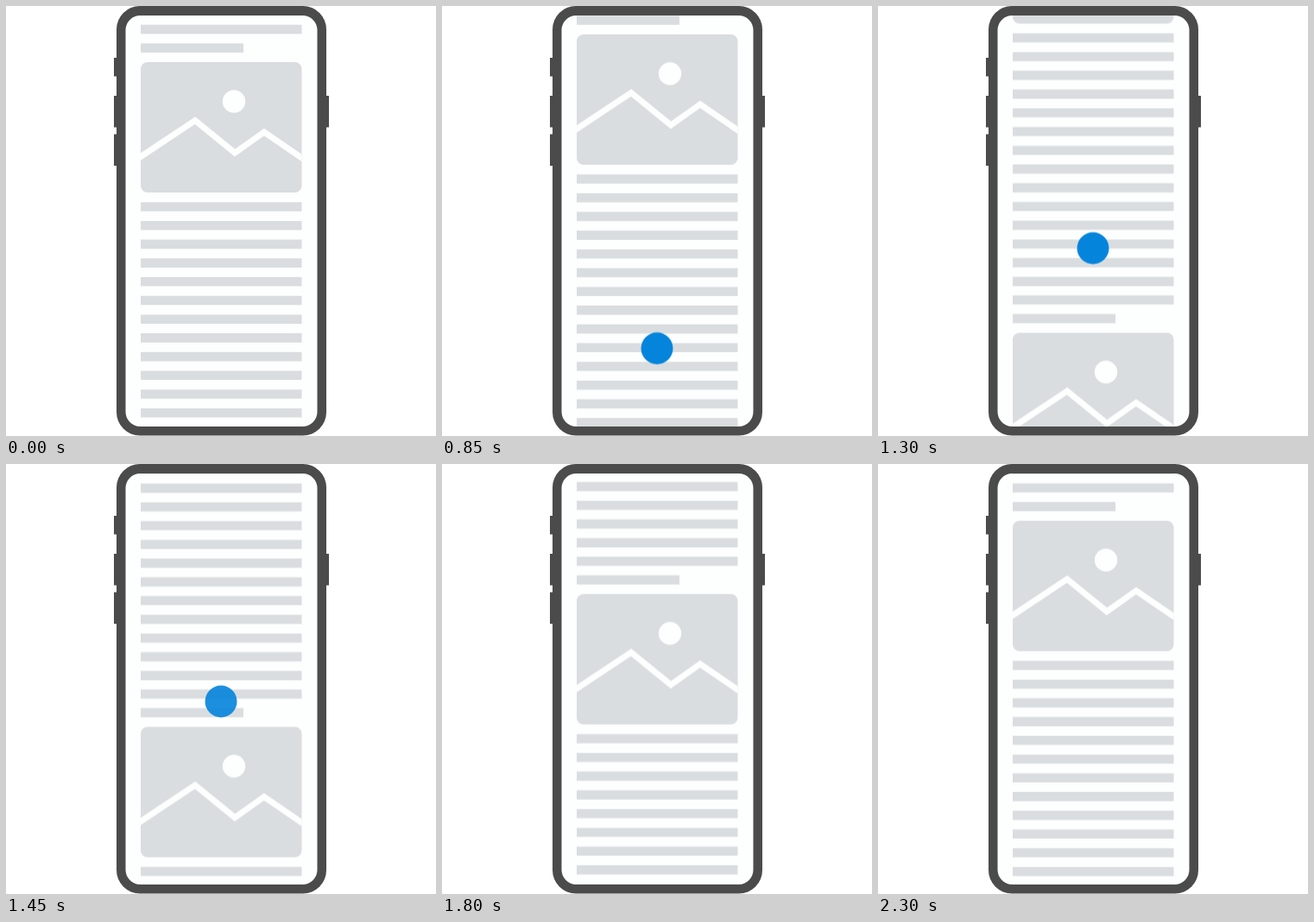
Recreate the animation shown at these times as an HTML page without scripts. Size 498 px wide and 498 px high, loop 2.35 s.

```html
<!DOCTYPE html>
<html lang="en">
<head>
<meta charset="utf-8">
<title>Scrolling article</title>
<style>
  html, body { margin: 0; width: 100%; height: 100%; overflow: hidden; background: #fff; }
  svg { display: block; width: 100%; height: 100%; }

  .page, .touch { animation: 2350ms linear infinite; }
  .page { animation-name: scroll; }
  .touch { fill: #0584dc; animation-name: drag, fade; }

  /* 540 ms to 2300 ms */
  @keyframes scroll {
    0%, 22.98% { transform: translateY(0); animation-timing-function: ease-in-out; }
    97.87%, 100% { transform: translateY(-508.3px); }
  }
  /* 550 ms to 1400 ms */
  @keyframes drag {
    0%, 23.4% { transform: translateY(0); animation-timing-function: cubic-bezier(.37, 0, .63, 1); }
    59.57%, 100% { transform: translateY(-168px); }
  }
  @keyframes fade {
    0%, 4.26% { opacity: 0; }
    19.15%, 60.43% { opacity: 1; }
    74.47%, 100% { opacity: 0; }
  }
</style>
</head>
<body>
<svg viewBox="0 0 498 498">
  <defs>
    <clipPath id="screen"><rect x="138.5" y="11" width="222" height="476" rx="17"/></clipPath>
    <clipPath id="photo"><rect x="156" y="65" width="186.500" height="151" rx="8"/></clipPath>
    <g id="article">
      <g fill="#d9dde0">
        <rect x="156" y="21.700" width="186.500" height="10.600"/>
        <rect x="156" y="43.300" width="119" height="10.600"/>
        <rect x="156" y="65" width="186.500" height="151" rx="8"/>
      </g>
      <g clip-path="url(#photo)">
        <path d="M150 178.500 219 132.500 265 170 299 146 350 181" fill="none" stroke="#fdfefe" stroke-width="7"/>
        <circle cx="264" cy="110.500" r="13.200" fill="#fdfefe"/>
      </g>
      <path d="M249.250 227.200V520" stroke="#d9dde0" stroke-width="186.500" stroke-dasharray="10.600 11.100"/>
    </g>
  </defs>

  <g fill="#4b4b4b">
    <rect x="128" width="243" height="497.500" rx="27"/>
    <rect x="125" y="60" width="5" height="21.500"/>
    <rect x="125" y="104" width="5" height="36.500"/>
    <rect x="125" y="148.500" width="5" height="36.500"/>
    <rect x="369" y="104" width="5" height="36.500"/>
  </g>

  <g clip-path="url(#screen)">
    <rect x="138" y="10" width="224" height="478" fill="#fdfefe"/>
    <g class="page">
      <use href="#article"/>
      <use href="#article" y="509"/>
    </g>
    <circle class="touch" cx="249" cy="443" r="18.500"/>
  </g>
</svg>
</body>
</html>
```
